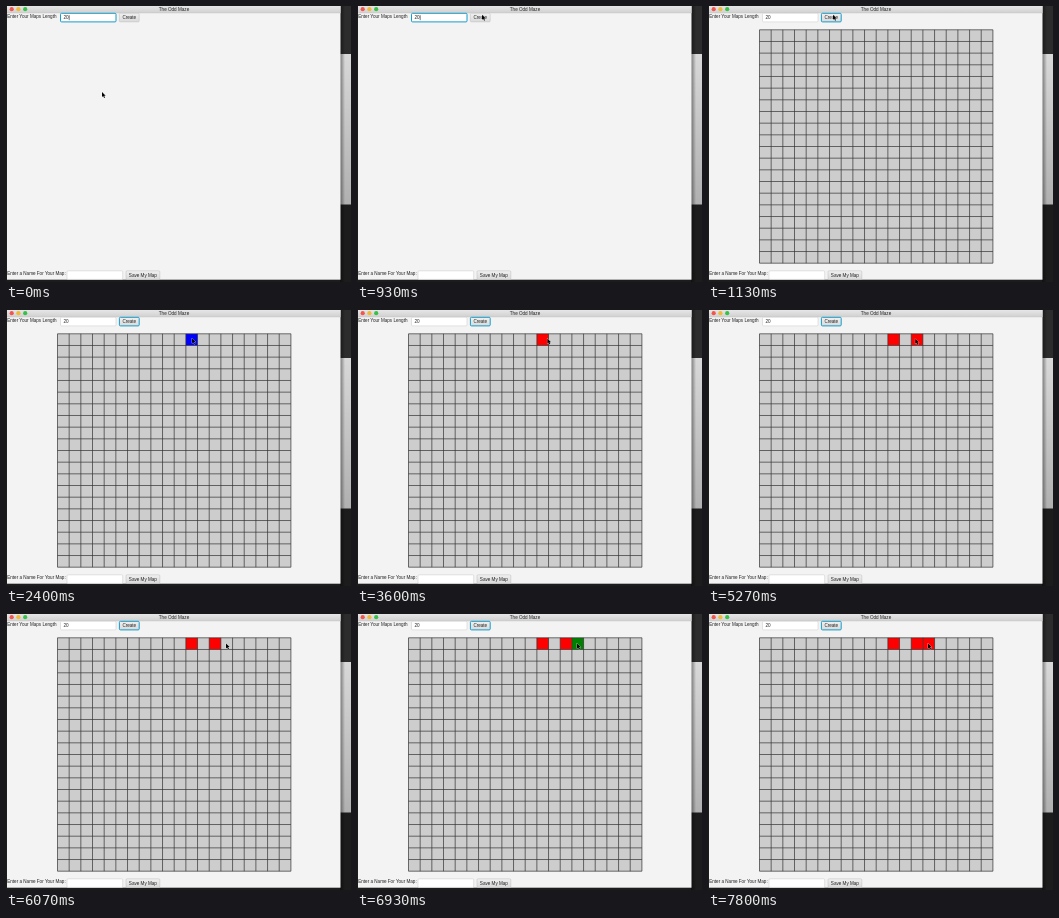
An HTML page for the animation above (8 s loop, 345 by 276 pixels).

```html
<!DOCTYPE html>
<html lang="en">
<head>
<meta charset="utf-8">
<title>Map editor</title>
<style>
  html, body { margin: 0; width: 100%; height: 100%; overflow: hidden; background: #1c1c1c; }
  svg { display: block; width: 345px; height: 276px; }
  text { font: 4.6px "Liberation Sans", Arial, sans-serif; fill: #222; }
  .field { fill: #fff; stroke: #c6c6c6; stroke-width: .5; }
  .button { fill: url(#face); stroke: #bcbcbc; stroke-width: .5; }
  .focus { stroke: #159cc9; stroke-width: 1; }
</style>
</head>
<body>
<svg viewBox="0 0 345 276">
  <defs>
    <linearGradient id="bar" x2="0" y2="1"><stop stop-color="#e6e6e6"/><stop offset="1" stop-color="#d0d0d0"/></linearGradient>
    <linearGradient id="face" x2="0" y2="1"><stop stop-color="#f0f0f0"/><stop offset="1" stop-color="#dadada"/></linearGradient>
    <linearGradient id="side" x2="0" y2="1"><stop stop-color="#d8d8d8"/><stop offset="1" stop-color="#b0b0b0"/></linearGradient>
    <linearGradient id="shade"><stop stop-opacity=".45"/><stop offset="1" stop-opacity="0"/></linearGradient>
  </defs>

  <!-- desktop behind the window -->
  <rect width="345" height="276" fill="#1c1c1c"/>
  <rect x="334" width="11" height="48" fill="#2c2c2c"/>
  <rect x="334" y="48" width="11" height="150.5" fill="url(#side)"/>
  <rect x="334" width="5" height="276" fill="url(#shade)"/>

  <!-- window -->
  <rect x="1" width="333.5" height="273.7" fill="#f3f3f3"/>
  <rect x="1" width="333.5" height="7" fill="url(#bar)"/>
  <path d="M1 7H334.5" stroke="#bbb" stroke-width=".4"/>
  <circle cx="5.7" cy="3.2" r="2.1" fill="#f4554f"/>
  <circle cx="12.4" cy="3.2" r="2.1" fill="#f2b932"/>
  <circle cx="19.2" cy="3.2" r="2.1" fill="#35c245"/>
  <text x="168" y="5" text-anchor="middle">The Odd Maze</text>

  <text x="1.2" y="11.5">Enter Your Maps Length</text>
  <rect id="length" class="field" x="54.5" y="7.3" width="55.5" height="8.6" rx="1"/>
  <text x="57.5" y="13.3">20</text>
  <path id="caret" d="M63.2 9.2V14.2" stroke="#222" stroke-width=".6"/>
  <rect id="create" class="button" x="113.4" y="7.3" width="19.8" height="8.6" rx="1"/>
  <text x="123.3" y="13.3" text-anchor="middle">Create</text>

  <text x="1.2" y="269.3">Enter a Name For Your Map:</text>
  <rect class="field" x="61" y="264.8" width="55.7" height="8.6" rx="1"/>
  <rect class="button" x="120" y="264.8" width="33.8" height="8.6" rx="1"/>
  <text x="136.9" y="270.8" text-anchor="middle">Save My Map</text>

  <g id="board">
    <rect x="51.5" y="23.8" width="233.4" height="233.4" fill="#cdcdcd"/>
    <g id="cells"></g>
    <path id="lines" fill="none" stroke="#333" stroke-width=".7"/>
  </g>
  <path id="cursor" d="M0 0V5L1.2 4L2.1 6L3 5.6L2.1 3.7H3.7Z" fill="#000" stroke="#fff" stroke-width=".5" paint-order="stroke"/>
</svg>
<script>
const $ = id => document.getElementById(id);
const FPS = 15, FRAMES = 120;
const LEFT = 51.5, TOP = 23.8, COUNT = 20, CELL = 11.67;
const CREATED = 17;
const COLORS = ["blue", "green", "red"];

// column in the top row, and the frames of its clicks
const clicks = [
  { col: 11, at: [36, 43, 50] },
  { col: 13, at: [66, 71, 78] },
  { col: 14, at: [96, 104, 117] }
];

// pointer stops: frame, x, y
const path = [
  [0, 96, 86], [3, 96, 86], [11, 125, 8.7], [21, 125, 8.7],
  [27, 210, 35], [31, 186, 28.3], [53, 186, 28.3], [56, 203, 29],
  [57, 203, 29], [59, 207.3, 28.8], [82, 207.3, 28.8], [91, 220, 29.4]
];

let d = "";
for (let i = 0; i <= COUNT; i++) {
  const step = i * CELL, size = COUNT * CELL;
  d += `M${LEFT + step} ${TOP}v${size}M${LEFT} ${TOP + step}h${size}`;
}
$("lines").setAttribute("d", d);
$("cells").innerHTML = clicks.map(({ col }) =>
  `<rect x="${LEFT + col * CELL}" y="${TOP}" width="${CELL}" height="${CELL}"/>`).join("");

const ease = p => p * p * (3 - 2 * p);

function pointer(frame) {
  const i = path.findIndex(stop => stop[0] > frame);
  if (i < 0) return path[path.length - 1].slice(1);
  const [f0, x0, y0] = path[i - 1], [f1, x1, y1] = path[i];
  const p = ease((frame - f0) / (f1 - f0));
  return [x0 + (x1 - x0) * p, y0 + (y1 - y0) * p];
}

const show = (el, on) => el.setAttribute("visibility", on ? "visible" : "hidden");

function draw(frame) {
  const created = frame >= CREATED;
  $("board").style.display = created ? "" : "none";
  $("length").classList.toggle("focus", !created);
  $("create").classList.toggle("focus", created);
  show($("caret"), !created && (frame < 7 || frame >= 14));
  clicks.forEach(({ at }, i) => {
    const count = at.filter(f => f <= frame).length;
    $("cells").children[i].setAttribute("fill", count ? COLORS[count - 1] : "none");
  });
  $("cursor").setAttribute("transform", `translate(${pointer(frame)})`);
}

const start = performance.now();
function tick() {
  const t = (performance.now() - start) / 1000;
  draw(Math.floor(t * FPS + .1) % FRAMES);
  requestAnimationFrame(tick);
}
tick();
</script>
</body>
</html>
```
